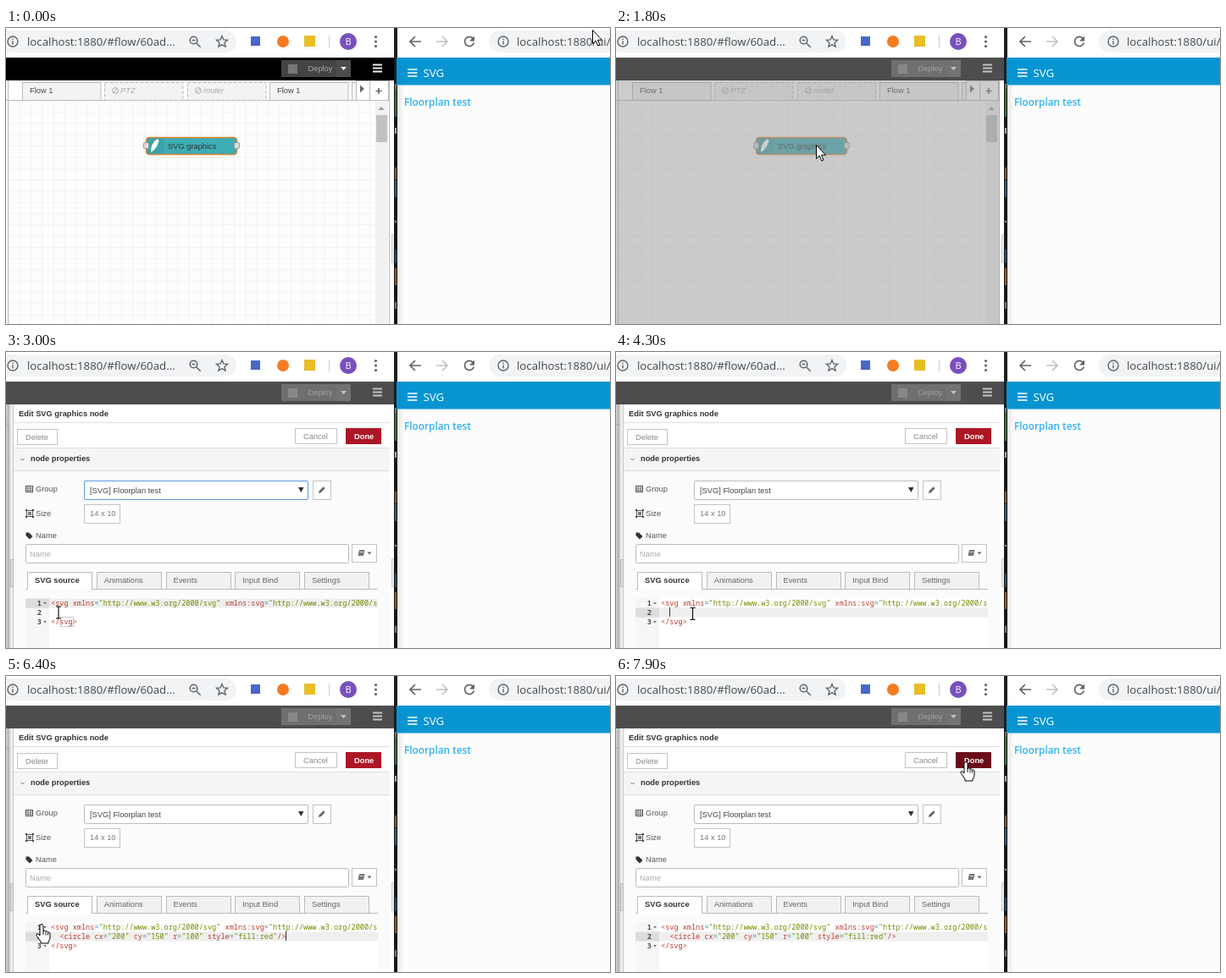
Recreate the animation shown at these times as an HTML page. Size 713x350 px, loop 8 s.

```html
<!DOCTYPE html>
<html lang="en">
<head>
<meta charset="utf-8">
<title>SVG node editor</title>
<style>
html, body { margin: 0; width: 100%; height: 100%; overflow: hidden; background: #fff; }
svg { display: block; width: 100%; height: 100%; }
text { font: 9.3px "Liberation Sans", Arial, sans-serif; white-space: pre; }
.ui { font-family: "Open Sans", "Noto Sans", sans-serif; }
.code { font-family: "Noto Sans Mono", "DejaVu Sans Mono", monospace; font-size: 8.57px; }
.bold { font-weight: bold; }
.italic { font-style: italic; }
</style>
</head>
<body>
<svg id="stage" viewBox="0 0 713 350"></svg>
<script>
const LOOP = 8000, STEP = 100;

// Markup helpers
const esc = s => String(s).replace(/&/g, '&amp;').replace(/</g, '&lt;');
const rect = (x, y, w, h, fill, more = '') =>
  `<rect x="${x}" y="${y}" width="${w}" height="${h}" fill="${fill}" ${more}/>`;
const box = (x, y, w, h, fill, stroke, more = '') =>
  rect(x + .5, y + .5, w - 1, h - 1, fill, `stroke="${stroke}" ${more}`);
const text = (x, y, s, fill, cls = '', more = '') =>
  `<text x="${x}" y="${y}" fill="${fill}" class="${cls}" ${more}>${esc(s)}</text>`;
const line = (d, stroke, width = 1, more = '') =>
  `<path d="${d}" fill="none" stroke="${stroke}" stroke-width="${width}" ${more}/>`;
const shape = (d, fill, more = '') => `<path d="${d}" fill="${fill}" ${more}/>`;
const circle = (x, y, r, fill, more = '') =>
  `<circle cx="${x}" cy="${y}" r="${r}" fill="${fill}" ${more}/>`;
const group = (id, content, more = '') => `<g id="${id}" ${more}>${content}</g>`;
const size = px => `style="font-size:${px}px"`;

const infoIcon = x => circle(x, 16, 6, 'none', 'stroke="#5f6368" stroke-width="1.4"') +
  line(`M${x} 12.6v1.4M${x} 15.2v4.3`, '#5f6368', 1.4);
const menuIcon = (x, y, w, gap, color, width) =>
  line([0, 1, 2].map(i => `M${x} ${y + i * gap}h${w}`).join(''), color, width);
const noEntry = (x, y) => circle(x, y, 3.4, 'none', 'stroke="#aaa"') +
  line(`M${x - 2.4} ${y + 2.4}l4.8 -4.8`, '#aaa');

function leftBrowser() {
  let s = rect(0, 0, 458, 35, '#fff') + rect(-20, 3, 292, 26, '#f1f3f4', 'rx="13"') + infoIcon(8) +
    text(25, 21, 'localhost:1880/#flow/60ad...', '#45484c', 'ui', size(13.25));
  s += circle(221.5, 14.5, 4.3, 'none', 'stroke="#5f6368" stroke-width="1.5"') +
    line('M224.7 17.7l5 5M219.5 14.5h4', '#5f6368', 1.5);
  s += line('M255 9.5l1.9 4.4 4.7.4-3.6 3.1 1.1 4.7-4.1-2.5-4.1 2.5 1.1-4.7-3.6-3.1 4.7-.4z', '#5f6368', 1.3);
  s += rect(289, 10, 11, 11, '#4767c9') + circle(327, 16, 7, '#f57c1f') + rect(352, 9, 13, 13, '#e9bd25') +
    line('M381.5 9v14', '#ccc');
  s += circle(404, 16, 10, '#7850bd') +
    text(404, 20, 'B', '#fff', 'ui', 'text-anchor="middle" ' + size(11));
  s += [10.5, 16, 21.5].map(y => circle(436.5, y, 1.6, '#5f6368')).join('');

  // Application header
  s += rect(0, 35, 458, 27, '#000') + rect(325, 38, 82, 20, '#444') + rect(390, 38, 17, 20, '#4c4c4c') +
    rect(333, 43, 11, 11, '#777') + text(356.5, 51, 'Deploy', '#aaa') + shape('M395 46h7l-3.5 4z', '#eee') +
    menuIcon(433, 43.5, 11, 4, '#eee', 2);

  // Workspace with its grid
  s += rect(0, 62, 458, 288, '#fff') + rect(3, 86, 433, 264, '#fdfdfd');
  let grid = '';
  for (let x = 3; x < 436; x += 40 / 3) grid += `M${x} 86V350`;
  for (let y = 86; y < 350; y += 40 / 3) grid += `M3 ${y}H436`;
  s += line(grid, '#f3f3ee') + line('M2.5 62V350M452.5 62V350M0 85.5H453', '#bbb');

  // Flow tabs
  [['Flow 1', 19], ['PTZ', 116, 1], ['router', 214, 1], ['Flow 1', 311]].forEach(([name, x, off]) => {
    s += box(x, 64, 93.5, 22, '#f3f3f3', '#bbb', off ? 'stroke-dasharray="4 2"' : '');
    s += off ? noEntry(x + 13, 74) + text(x + 19, 77, name, '#aaa', 'italic') : text(x + 9, 77, name, '#444');
  });
  s += box(408, 64, 8, 22, '#f3f3f3', '#bbb') + box(413, 62, 17, 24, '#fff', '#bbb') +
    box(429, 62, 23, 24, '#fff', '#bbb') + shape('M418 67.5v9l5-4.5z', '#666') + line('M436.5 74.5h7M440 71v7', '#666', 1.6);

  // Scrollbar and sidebar grip
  s += rect(436, 86, 15, 264, '#f1f1f1') + shape('M439.5 97h7l-3.5-4z', '#999') + rect(437, 103, 13, 32, '#c1c1c1') +
    box(455, 244, 4, 34, '#eee', '#ccc');

  // The node
  s += rect(165.5, 129.5, 107, 20, '#3fadb5', 'rx="3.5"') + rect(166, 130, 20, 19, '#000', 'opacity=".06"') +
    rect(165.5, 129.5, 107, 20, 'none', 'rx="3.5" stroke="#d98432" stroke-width="1.4"') +
    shape('M171 147q-.5-7 4-13l4-3 1.5 2.5-2 5.5q-2.5 5-7.5 8z', '#fff') +
    box(162, 135, 7, 8, '#ddd', '#999', 'rx="1.5"') + box(269, 135, 7, 8, '#ddd', '#999', 'rx="1.5"') +
    text(191, 142.5, 'SVG graphics', '#333');
  return s;
}

function rightBrowser() {
  const gap = [[0, 62, '#222'], [66, 6, '#777'], [72, 33, '#2f7a35'], [118, 7, '#aaa'], [165, 14, '#8a5a35'],
    [180, 20, '#2d5c8c'], [228, 2, '#999'], [262, 16, '#274a70'], [284, 20, '#a05a20'], [324, 8, '#777']];
  let s = rect(458, 0, 4, 350, '#181818') + gap.map(([y, h, c]) => rect(459, y, 2, h, c)).join('');
  s += rect(462, 0, 251, 35, '#fff') + rect(570, 3, 170, 26, '#f1f3f4', 'rx="13"') + infoIcon(587) +
    text(603, 21, 'localhost:1880/ui/', '#45484c', 'ui', size(13.25));
  s += line('M490 16H477M483 10l-6 6 6 6', '#5f6368', 1.7) + line('M508 16h13M515 10l6 6-6 6', '#c0c2c4', 1.7) +
    line('M551.5 12.5A5.6 5.6 0 1 0 552.4 17.5', '#5f6368', 1.7) + shape('M553 9.5v6h-6z', '#5f6368');
  s += rect(462, 35, 251, 315, '#fcfcfc') + rect(462, 68, 8, 282, 'url(#edgeShade)') +
    rect(461, 35, 252, 32.5, '#0694d2') +
    menuIcon(474, 49, 11.5, 4, '#fff', 1.5) + text(492.5, 57.5, 'SVG', '#fff', 'ui', size(13.3)) +
    text(470, 92, 'Floorplan test', '#2fb0ee', 'ui', 'style="font-size:11.8px;font-weight:600"');
  return s;
}

const button = (x, y, w, h, label, tx) =>
  box(x, y, w, h, '#fff', '#c4c4c4') + text(tx, y + 13, label, '#888');

function highlight(source) {
  return source.replace(/("[^"]*")|(=)|[^"=]+/g, (part, string, equals) =>
    `<tspan fill="${string ? '#718c00' : equals ? '#3e999f' : '#c0392b'}">${esc(part)}</tspan>`);
}
const codeLine = (x, y, source, more = '') =>
  `<text class="code" x="${x}" y="${y}" ${more}>${highlight(source)}</text>`;

function editorPanel() {
  let s = rect(4, 62, 470, 288, '#fbfbfb') + rect(4, 62, 5, 288, '#eee') + line('M4.5 62V350M8.5 62V350', '#c8c8c8') +
    box(5, 245, 4, 33, '#ddd', '#bbb');
  s += rect(9, 62, 460, 51, '#fff') + rect(9, 113, 460, 27, '#f5f5f5') +
    line('M9 83.5H470M9 113.5H470M9 140.5H470', '#ddd');
  s += text(15, 76, 'Edit SVG graphics node', '#333', 'bold') + button(13, 91, 48, 19, 'Delete', 23) +
    button(341, 90, 50, 19, 'Cancel', 351) + rect(401, 90, 42, 19, '#ad1625', 'id="done"') +
    text(411, 103, 'Done', '#fff', 'bold') +
    line('M17.5 126l2 2 2-2', '#666') + text(29, 129, 'node properties', '#333', 'bold');

  // Form rows
  s += box(23, 158, 9, 8, '#fff', '#555') + line('M23 161h9M23 163.5h9M26 158v8M29 158v8', '#555', .8) +
    text(35, 165, 'Group', '#555') + box(92, 152, 265, 23, '#fff', '#bbb', 'id="select" rx="1.5"') +
    text(99, 167, '[SVG] Floorplan test', '#444') + shape('M345 160h6.5l-3.25 6z', '#333') +
    box(362, 152, 22, 23, '#fff', '#c4c4c4') + shape('M369 167l.7-2.7 5-5 2 2-5 5z', '#666');
  s += box(24, 187, 8, 8, '#fff', '#555') + rect(26, 189, 4, 4, '#777') +
    [23, 31].map(x => rect(x, 186, 2, 2, '#444') + rect(x, 194, 2, 2, '#444')).join('') +
    text(35, 194, 'Size', '#555') + box(92, 180, 43, 23, '#fff', '#c4c4c4') + text(99, 194, '14 x 10', '#777');
  s += shape('M23.5 213.5h3.5l4.5 4.5-3.5 3.5-4.5-4.5z', '#333') + text(35, 220, 'Name', '#555') +
    box(23, 227, 382, 23, '#fff', '#bbb', 'rx="2"') + text(28, 242, 'Name', '#aaa') +
    box(408, 227, 30, 22, '#fff', '#c4c4c4') + shape('M417 234h6.5l-1.5 7h-6.5z', '#777') +
    line('M418 236.5h3.5', '#fff', .8) + shape('M426.5 236.5h5l-2.5 3z', '#666');

  // Editor tabs
  s += line('M23 280.5H439', '#bbb');
  ['SVG source', 'Animations', 'Events', 'Input Bind', 'Settings'].forEach((name, i) => {
    const x = 25 + i * 81.75;
    s += box(Math.round(x), 260, 77, 21, i ? '#f1f1f1' : '#fff', '#bbb') +
      text(x + 9, 273, name, i ? '#666' : '#333', i ? '' : 'bold');
  });
  s += rect(26, 280, 75, 1, '#fff');

  // Source code
  s += rect(23, 291, 416, 59, '#fff') + rect(23, 291, 28, 59, '#f6f6f6') +
    group('activeLine', rect(51, 291.5, 388, 11, '#efefef') + rect(23, 291.5, 28, 11, '#dcdcdc'));
  s += [1, 2, 3].map(n => text(42, 289 + n * 11, n, '#4d4d4c', 'code bold', 'text-anchor="end"')).join('');
  s += shape('M44 296h4l-2 2.5zM44 318h4l-2 2.5z', '#777');
  s += box(64, 313, 16, 12, 'none', '#c9c9c9', 'id="tagMatch"');
  s += group('code',
    codeLine(53, 300, '<svg xmlns="http://www.w3.org/2000/svg" xmlns:svg="http://www.w3.org/2000/svg">') +
    codeLine(63.3, 311, '<circle cx="200" cy="150" r="100" style="fill:red"/>', 'id="circleLine"') +
    codeLine(53, 322, '</svg>'), 'clip-path="url(#codeClip)"');
  return s + rect(63, 302, 1, 11, '#333', 'id="caret"');
}

const outlined = 'stroke="#000" stroke-width="1" stroke-linejoin="round"';
const cursors = {
  arrow: shape('M.5.5V16.5L4.2 13 6.7 19 9 18 6.5 12.2H11.5Z', '#fff', outlined),
  move: shape('M0-11L4-7H1.5V-1.5H7V-4L11 0 7 4V1.5H1.5V7H4L0 11-4 7H-1.5V1.5H-7V4L-11 0-7-4V-1.5H-1.5V-7H-4Z', '#fff', outlined),
  hand: shape('M-2 2.5Q-2 .5 0 .5T2 2.5V8.5Q3.5 7 5 9 6.5 8 7.5 10 10 9.5 10 12V16Q10 19 8 21V23H-1V21L-5.5 14.5Q-7 12-5 11.5-4 11.5-2 14Z', '#fff', outlined) +
    line('M2 8v5M5 9.5v4M7.5 10.5v3', '#000', .9),
  ibeam: line('M-3-7H-1L0-6 1-7H3M0-6V6M-3 7H-1L0 6 1 7H3', '#000', 1.1)
};

// time, x, y, cursor kind from then on
const track = [
  [0, 692, 2, 'arrow'], [100, 692, 2, ''], [400, 294, 10, 'arrow'], [800, 236, 138, 'arrow'],
  [900, 236, 138, 'move'], [1800, 236, 138, 'arrow'], [1900, 236, 138, 'hand'], [2400, 236, 138, 'hand'],
  [2600, 200, 178, 'arrow'], [2900, 75, 295, 'ibeam'], [3000, 62, 308, 'ibeam'], [3300, 56, 246, 'ibeam'],
  [3500, 58, 255, 'arrow'], [3800, 72, 293, 'ibeam'], [4200, 90.5, 309.5, 'ibeam'], [5400, 90.5, 309.5, 'ibeam'],
  [5800, 105, 328, 'ibeam'], [6200, 76, 300, 'ibeam'], [6300, 63, 294, 'ibeam'], [6400, 42, 293, 'hand'],
  [6600, 60, 300, 'ibeam'], [7200, 154, 319, 'ibeam'], [7400, 240, 245, 'arrow'],
  [7800, 410, 108, 'hand'], [7900, 413, 101, 'hand'], [LOOP, 413, 101, 'hand']
];

function pointerAt(t) {
  const next = track.findIndex(p => p[0] > t);
  const [t0, x0, y0, kind] = track[next - 1], [t1, x1, y1] = track[next];
  const k = (t - t0) / (t1 - t0);
  return { x: x0 + (x1 - x0) * k, y: y0 + (y1 - y0) * k, kind };
}

document.getElementById('stage').innerHTML =
  `<defs><clipPath id="trayClip">${rect(0, 62, 453, 288, '#000')}</clipPath>
  <clipPath id="codeClip">${rect(23, 291, 416, 59, '#000')}</clipPath>
  <linearGradient id="edgeShade"><stop stop-color="#e6e6e6"/><stop offset="1" stop-color="#fcfcfc"/></linearGradient></defs>` +
  leftBrowser() + group('dim', shape('M0 35H458V62H453V350H0Z', '#999', 'opacity=".5"')) +
  `<g clip-path="url(#trayClip)">${group('panel', editorPanel())}</g>` + rightBrowser() +
  group('pointer', Object.entries(cursors).map(([kind, art]) => group(kind, art)).join(''));

const el = id => document.getElementById(id);
const show = (id, on) => { el(id).style.display = on ? '' : 'none'; };
const attr = (id, name, value) => el(id).setAttribute(name, value);

function draw(t) {
  const editing = t >= 4300, pasted = t >= 5500;
  show('dim', t >= 1800);
  show('panel', t >= 1900);
  const slide = t < 2100 ? 7 * 16 ** ((2000 - t) / 100) : 0;
  attr('panel', 'transform', `translate(${slide})`);

  attr('select', 'stroke', editing ? '#bbb' : '#5a9be0');
  attr('done', 'fill', t >= 7800 ? '#6b0d1b' : '#ad1625');
  attr('activeLine', 'transform', `translate(0 ${editing ? 11 : 0})`);
  show('tagMatch', !editing);
  show('circleLine', pasted);
  attr('caret', 'x', pasted ? 330 : 63);
  show('caret', editing && (t - (pasted ? 5500 : 4300)) % 900 < 600);

  const { x, y, kind } = pointerAt(t);
  attr('pointer', 'transform', `translate(${x} ${y})`);
  Object.keys(cursors).forEach(name => show(name, name === kind));
}

function tick() {
  draw(Math.floor(performance.now() % LOOP / STEP) * STEP);
  requestAnimationFrame(tick);
}
tick();
</script>
</body>
</html>
```
